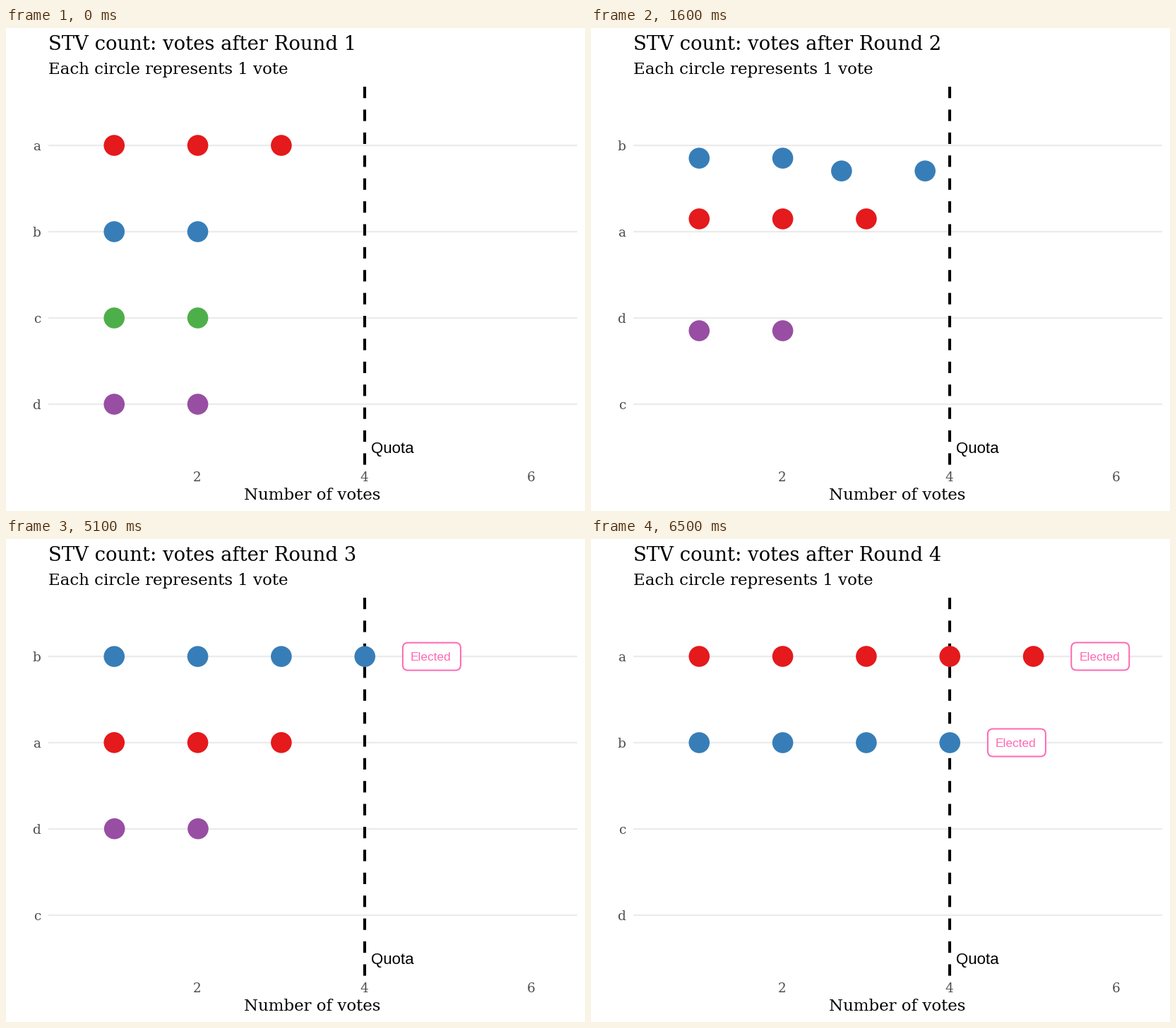
Recreate the animation shown at these times as a matplotlib script. Size 820 by 683 pixels, loop 8000 ms.

```python
import matplotlib.pyplot as plt
from matplotlib.animation import FuncAnimation
from matplotlib.patches import Circle, FancyBboxPatch

W, H, DPI = 820, 683, 64
PT = 72 / DPI                      # points per pixel
FRAMES, STEP = 80, 100
SERIF, SANS = "DejaVu Serif", "Liberation Sans"
COLORS = dict(a="#E41A1C", b="#377EB8", c="#4DAF4A", d="#984EA3")
PINK, GREY = "#FF69B4", "#4D4D4D"

# Row order and the holder of each ballot in the three arrangements
ORDERS = ["abcd", "badc", "abcd"]
HOLDERS = ["aaabbccdd", "aaabbbbdd", "aaabbbbaa"]
MOVES = [6, 50]                    # first frame of each transition
LENGTH = 15
ROUND_STARTS = [14, 36, 58]


def px(votes):
    return 34.9 + 118.33 * votes


def py(row):
    return 166 + 122 * row


def ease(p):
    p = min(max(p, 0), 1)
    return 4 * p ** 3 if p < 0.5 else 1 - 4 * (1 - p) ** 3


def mix(p, q, t):
    return tuple(u + (v - u) * t for u, v in zip(p, q))


def layout(stage):
    """Position of every ballot, stacked along its holder's row."""
    seen, spots = {}, []
    for who in HOLDERS[stage]:
        seen[who] = seen.get(who, 0) + 1
        spots.append((px(seen[who]), py(ORDERS[stage].index(who))))
    return spots


SPOTS = [layout(s) for s in range(3)]

fig = plt.figure(figsize=(W / DPI, H / DPI), dpi=DPI, facecolor="white")
ax = fig.add_axes([0, 0, 1, 1])
ax.set_xlim(0, W)
ax.set_ylim(H, 0)
ax.axis("off")


def write(x, y, text, size, color="black", font=SERIF, ha="left", z=6):
    return ax.text(x, y, text, fontsize=size * PT, color=color, family=font,
                   ha=ha, va="baseline", zorder=z)


class Badge:
    """Rounded 'Elected' tag centred on a point."""
    w, h = 82, 39

    def __init__(self):
        style = "round,pad=0,rounding_size=7.5"
        self.box = FancyBboxPatch((0, 0), self.w, self.h, boxstyle=style,
                                  fc="white", ec=PINK, lw=2 * PT, zorder=7)
        ax.add_patch(self.box)
        self.text = write(0, 0, "Elected", 17.2, PINK, SANS, "center", 8)

    def place(self, pos, shown):
        x, y = pos
        self.box.set_x(x - self.w / 2)
        self.box.set_y(y - self.h / 2)
        self.text.set_position((x - 1.2, y + 6.3))
        self.box.set_visible(shown)
        self.text.set_visible(shown)


title = write(60, 31, "", 27.5)
write(60, 65.5, "Each circle represents 1 vote", 22.92)
write(433.3, 667, "Number of votes", 22.92, ha="center")
write(517, 601, "Quota", 22.2, font=SANS)
for n in (2, 4, 6):
    write(px(n) - 1.2, 641, str(n), 18.33, GREY, ha="center")

names = []
for row in range(4):
    ax.plot([60, 808.5], [py(row)] * 2, color="#EBEBEB", lw=2.2 * PT,
            solid_capstyle="butt", zorder=1)
    names.append(write(49.2, py(row) + 7, "", 18.33, GREY, ha="right"))
ax.plot([px(4)] * 2, [83, 617.5], color="black", lw=4.05 * PT,
        linestyle=(0, (4, 4)), dash_capstyle="butt", zorder=2)

dots = [Circle(p, 14.8, lw=0, zorder=4) for p in SPOTS[0]]
for dot in dots:
    ax.add_patch(dot)
badge_b, badge_a = Badge(), Badge()


def update(i):
    k = 0 if i < MOVES[1] else 1
    t = ease((i - MOVES[k]) / LENGTH)
    stage = k + (t >= 0.5)

    title.set_text("STV count: votes after Round "
                   f"{1 + sum(i >= s for s in ROUND_STARTS)}")
    for label, name in zip(names, ORDERS[stage]):
        label.set_text(name)
    for dot, p, q, who in zip(dots, SPOTS[k], SPOTS[k + 1], HOLDERS[stage]):
        dot.center = mix(p, q, t)
        dot.set_facecolor(COLORS[who])

    t2 = t if k else 0
    badge_b.place(mix((px(4.8), py(0)), (px(4.8), py(1)), t2),
                  i >= MOVES[0] + LENGTH)
    badge_a.place(mix((px(1.8), py(1)), (px(5.8), py(0)), t2), stage == 2)
    return []


anim = FuncAnimation(fig, update, frames=FRAMES, interval=STEP,
                     repeat=True, repeat_delay=0, blit=False)
plt.show()
```
